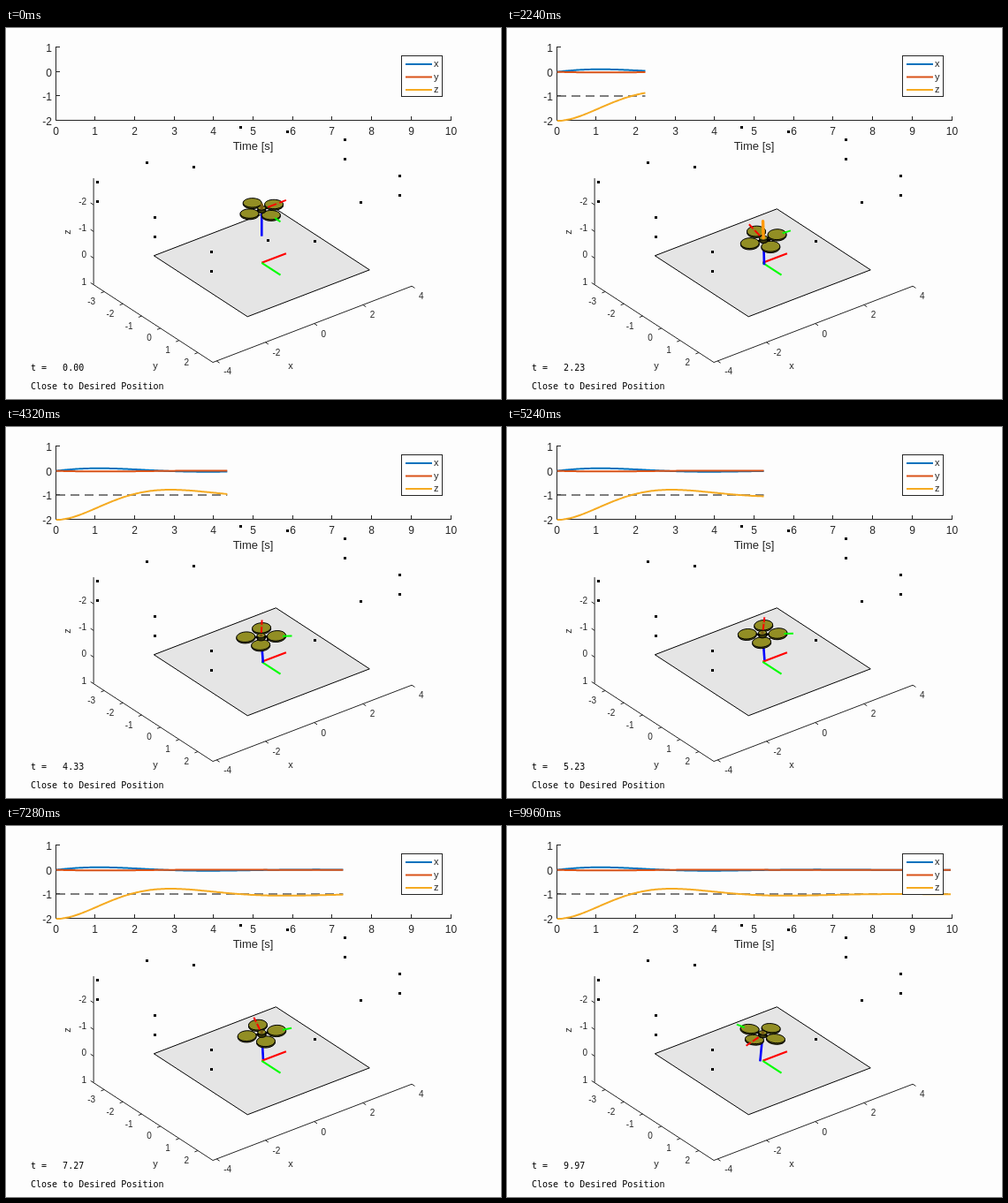
An HTML page with a canvas that plays this animation: 560x420 px, repeating every 10000 ms.

```html
<!DOCTYPE html>
<html>
<head>
<meta charset="utf-8">
<style>
  html, body { margin: 0; width: 100%; height: 100%; overflow: hidden; background: #fdfdfd; }
  canvas { display: block; }
</style>
</head>
<body>
<canvas id="stage" width="560" height="420"></canvas>
<script>
const ctx = document.getElementById('stage').getContext('2d');
const SANS = '"Liberation Sans", Arial, sans-serif';
const MONO = '"DejaVu Sans Mono", monospace';
const INK = '#262626';
const COLORS = { x: '#0072bd', y: '#d95319', z: '#f5ab23' };

// Orthographic view: azimuth -37.5 deg, elevation 30 deg, z pointing down.
const SCALE = 34.8, AZ = 37.5 * Math.PI / 180;
const CX = SCALE * Math.cos(AZ), SX = SCALE * Math.sin(AZ);
const project = ([x, y, z]) => [
  289.3 + CX * x + SX * y,
  265.8 - SX / 2 * x + CX / 2 * y + SCALE * 0.866 * z
];
const nearness = ([x, y, z]) => (-SX * x + CX * y) * 0.866 - z * SCALE / 2;

const X_MIN = -4.15, X_MAX = 4, Y_MIN = -3.57, Y_MAX = 2.8;

// Damped response of each coordinate
const motion = {
  x: t => 0.175 * Math.exp(-0.4 * t) * Math.sin(1.14 * t),
  y: t => -0.035 * Math.exp(-0.3 * t) * Math.sin(1.1 * t),
  z: t => -1 - Math.exp(-0.507 * t) * (Math.cos(1.083 * t) + 0.468 * Math.sin(1.083 * t))
};

// Heading key points: seconds, degrees
const HEADINGS = [[0, 0], [1.4, -11], [3.13, -158], [4.33, -51], [6.17, -47], [8.43, -90], [9.97, -200]];

function headingAt(t) {
  const i = Math.max(1, HEADINGS.findIndex(([time]) => t <= time));
  const [t0, a] = HEADINGS[i - 1], [t1, b] = HEADINGS[i];
  const u = (t - t0) / (t1 - t0);
  return (a + (b - a) * u * u * (3 - 2 * u)) * Math.PI / 180;
}

const tiltAt = t => 0.06 * (1 - Math.exp(-2 * t));
const thrustAt = t => 0.75 * Math.exp(-(((t - 1.9) / 1.6) ** 2));

function path(points, color, width = 1, fill) {
  ctx.beginPath();
  points.forEach(p => ctx.lineTo(p[0], p[1]));
  if (fill) {
    ctx.closePath();
    ctx.fillStyle = fill;
    ctx.fill();
  }
  ctx.strokeStyle = color;
  ctx.lineWidth = width;
  ctx.stroke();
}

function label(str, x, y, size, align = 'center', family = SANS, color = INK) {
  ctx.font = size + 'px ' + family;
  ctx.textAlign = align;
  ctx.fillStyle = color;
  ctx.fillText(str, x, y);
}

const plotX = t => 56.7 + t * 44.68;
const plotY = v => 49.7 - v * 27.7;

function drawPlot(t) {
  path([[56.5, 21], [56.5, 104.5], [504, 104.5]], INK);
  for (let i = 0; i <= 10; i++) {
    const x = Math.round(plotX(i)) - 0.5;
    path([[x, 104.5], [x, 100]], INK);
    label(i, x, 121, 12);
  }
  for (let v = -2; v <= 1; v++) {
    const y = Math.round(plotY(v)) - 0.5;
    path([[56.5, y], [61, y]], INK);
    label(v, 52, y + 5, 12, 'right');
  }
  label('Time [s]', 279.5, 138, 13);

  if (t > 0) {
    ctx.setLineDash([10, 6]);
    path([[57, 77], [plotX(t), 77]], '#555', 1.3);
    ctx.setLineDash([]);
    for (const axis in motion) {
      const points = [];
      for (let s = 0; s <= t + 0.001; s += 1 / 30) points.push([plotX(s), plotY(motion[axis](s))]);
      path(points, COLORS[axis], 2);
    }
  }

  ctx.fillStyle = '#fff';
  ctx.fillRect(447, 31, 47, 47);
  ctx.strokeStyle = INK;
  ctx.lineWidth = 1;
  ctx.strokeRect(447.5, 31.5, 46, 46);
  Object.keys(COLORS).forEach((name, i) => {
    const y = 41 + i * 14.5;
    path([[452, y], [482, y]], COLORS[name], 2);
    label(name, 484, y + 3, 11, 'left');
  });
}

function drawTick(point, dx, dy, str, lx, ly, align) {
  const [x, y] = project(point);
  path([[x, y], [x + dx, y + dy]], INK);
  label(str, x + lx, y + ly, 10, align);
}

function drawDots() {
  ctx.fillStyle = '#000';
  const dot = (x, y) => ctx.fillRect(Math.round(x) - 1, Math.round(y) - 1, 3, 3);
  const column = (x, y) => { dot(x, y); dot(x, y + 22); };
  for (let k = 0; k < 3; k++) column(103 + 64.5 * k, 174 + 39.5 * k);
  for (let k = 0; k < 2; k++) column(383 + 62 * k, 125.5 + 41 * k);
  // The long walls alternate between the upper and lower row.
  for (let k = 0; k < 3; k++) dot(296 + 52.5 * k, 240 - 21.5 * k + k % 2 * 22);
  for (let k = 0; k < 4; k++) dot(159 + 53 * k, 152 - 20 * k + k % 2 * 25);
}

function drawScene() {
  const line = (...pts) => path(pts.map(project), INK);
  line([X_MIN, Y_MIN, -3], [X_MIN, Y_MIN, 1], [X_MIN, Y_MAX, 1], [X_MAX, Y_MAX, 1]);
  for (let x = -4; x <= 4; x += 2) drawTick([x, Y_MAX, 1], 3.4, 2.2, x, 8, 15, 'left');
  for (let y = -3; y <= 2; y++) drawTick([X_MIN, y, 1], -3.7, 1.4, y, -10, 14.5, 'right');
  for (let z = -2; z <= 1; z++) drawTick([X_MIN, Y_MIN, z], -3.4, -2.2, z, -8, 0, 'right');
  label('x', 322, 386, 11);
  label('y', 169, 386, 11);
  ctx.save();
  ctx.translate(73, 231);
  ctx.rotate(-Math.PI / 2);
  label('z', 0, 0, 11);
  ctx.restore();

  const r = 2.5;
  path([[-r, -r, 0], [r, -r, 0], [r, r, 0], [-r, r, 0], [-r, -r, 0]].map(project), '#000', 1, '#e5e5e5');
  drawDots();
  path([[0, 0, 0], [1, 0, 0]].map(project), '#f00', 2.2);
  path([[0, 0, 0], [0, 1, 0]].map(project), '#0f0', 2.2);
}

function drawDrone(t) {
  const heading = headingAt(t), tilt = tiltAt(t), thrust = thrustAt(t);
  const c = Math.cos(heading), s = Math.sin(heading);
  const center = [motion.x(t), motion.y(t), motion.z(t)];
  const turn = (x, y, z) => [
    c * x - s * y + (c - s) * tilt * z,
    s * x + c * y + (s + c) * tilt * z,
    z - tilt * (x + y)
  ];
  const place = (x, y, z) => project(turn(x, y, z).map((v, i) => v + center[i]));
  const ring = (x, y, z, r, n = 24) => Array.from({ length: n + 1 }, (_, i) => {
    const a = i / n * 2 * Math.PI;
    return place(x + r * Math.cos(a), y + r * Math.sin(a), z);
  });
  const rod = (from, to, color, width) => path([place(...from), place(...to)], color, width);

  function disc(x, y, r, h) {
    const low = ring(x, y, h, r), top = ring(x, y, -h, r);
    path(low, '#000', 1, '#6a6615');
    low.forEach((p, i) => path([p, top[i]], '#000', 0.6));
    path(top, '#000', 1, '#928e24');
  }

  rod([0, 0, 0], [0, 0, 1], '#00f', 2.6);
  const arms = [[0.5, 0], [-0.5, 0], [0, 0.5], [0, -0.5]];
  arms.sort((a, b) => nearness(turn(...a, 0)) - nearness(turn(...b, 0)));
  arms.forEach(([x, y]) => {
    rod([0, 0, 0], [x * 0.6, y * 0.6, 0], '#000', 2.5);
    disc(x, y, 0.3, 0.025);
  });
  rod([0.25, 0, 0], [1, 0, 0], '#f00', 2);
  rod([0.6, 0, 0], [0.72, 0, 0], '#928e24', 2);
  rod([0, 0.7, 0], [0, 1, 0], '#0f0', 2);
  disc(0, 0, 0.13, 0.06);
  ctx.lineCap = 'round';
  rod([0, 0, -0.06], [0, 0, -Math.max(0.07, thrust)], thrust > 0.2 ? '#ff9a0a' : '#7a5a14', 3.4);
  ctx.lineCap = 'butt';
}

function render(now) {
  const clock = Math.floor(now % 10000 / 40) * 0.04;
  const t = Math.round(clock * 30) / 30;
  ctx.fillStyle = '#fdfdfd';
  ctx.fillRect(0, 0, 560, 420);
  drawPlot(t);
  drawScene();
  drawDrone(t);
  label('t = ' + t.toFixed(2).padStart(6), 28, 388, 10, 'left', MONO, '#000');
  label('Close to Desired Position', 28, 409, 10, 'left', MONO, '#000');
  requestAnimationFrame(render);
}
requestAnimationFrame(render);
</script>
</body>
</html>
```
